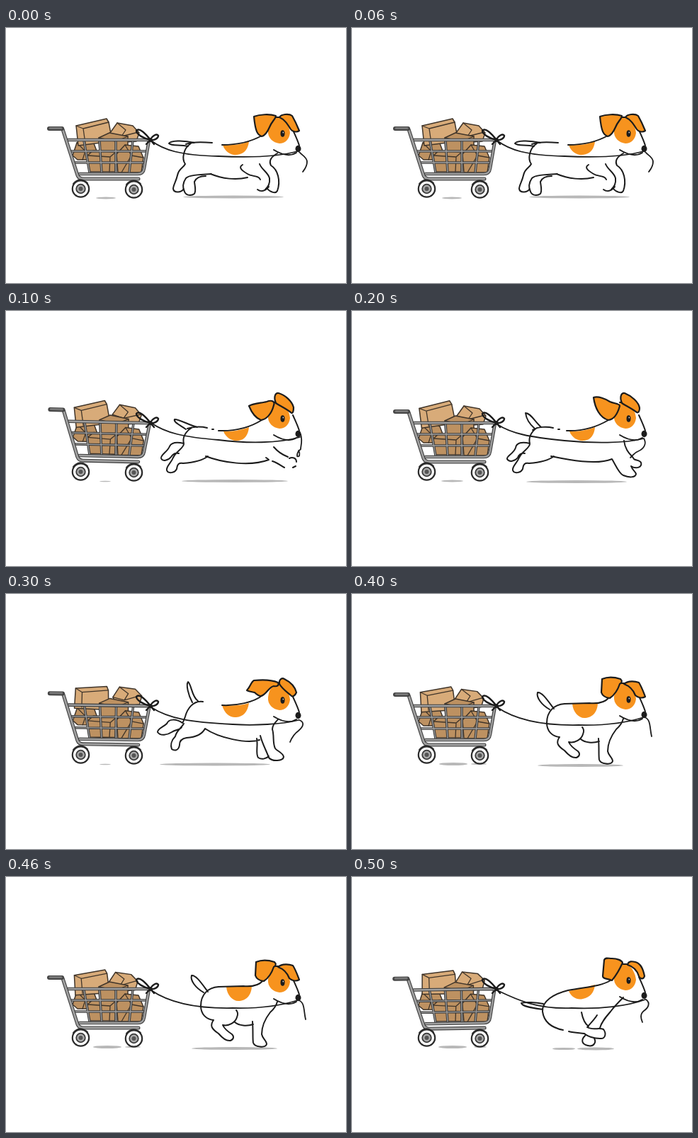
Write an HTML page with a canvas that moves like this. It is 480 by 360 pixels and loops after 0.6 s.

```html
<!DOCTYPE html>
<html lang="en">
<head>
<meta charset="utf-8">
<title>Dog pulling a cart</title>
<style>
html, body { margin: 0; width: 100%; height: 100%; overflow: hidden; background: #fff; }
canvas { display: block; }
</style>
</head>
<body>
<canvas id="stage" width="480" height="360"></canvas>
<script>
const ctx = document.getElementById('stage').getContext('2d');
const INK = '#1c1c1c', ORANGE = '#f7931e', TAN = '#d8ab79', SHADED = '#bd9161', GREY = '#b8b8b8';
const STEP = 100;

// tilt: cart angle in degrees; big, small: [dx, dy, degrees] of the top boxes;
// head: vertical shift; shade: [left, right, y] ground shadows
const poses = [
  {
    tilt: 0, big: [0, 0, 0], small: [0, 0, 0], head: -1,
    shade: [[250, 392, 238.5], [127, 155, 240]],
    ears: ['M350 125C358 122 372 121 381 124C381 128 375 132 372 140C369 147 365 152 361 153C355 151 352 146 350 125Z',
      'M386 126C388 122 399 120 404 124C408 131 412 140 414 145C410 148 404 146 402 143C397 135 393 129 386 126Z'],
    spot: 'M306 165C309 175 318 180 326 179C337 178 342 170 343 160C330 165 318 166 306 165Z',
    body: 'M266 162C249 158 232 159 230 163C234 167 246 164 257 167M254 164C264 160 280 161 291 162M305 165C325 165 345 161 361 152' +
      'M261 163C250 170 248 185 253 192C250 198 244 198 242 208C240 217 236 222 236 227C237 233 247 233 251 227' +
      'M290 206C270 207 258 208 254 212C250 218 249 225 252 231C254 237 262 237 266 234C269 229 266 221 266 217C269 210 276 209 282 209' +
      'M289 206C305 213 325 215 341 211M334 193C327 197 334 202 341 206C347 210 357 208 359 214M371 224C366 230 360 232 355 228' +
      'M358 192C361 200 370 204 372 212C373 220 370 224 366 228M383 177C374 182 371 188 374 194C384 200 388 216 383 230C381 234 373 232 369 227',
    rope: 'M205 159C222 172 246 180 300 181C340 183 380 183 412 174M414 175C418 180 425 182 425 189C425 196 421 200 419 203'
  },
  {
    tilt: 1.3, big: [-4, 0, -1], small: [2, -1, 0], head: 2,
    shade: [[248, 398, 240], [132, 148, 240.5]],
    ears: ['M343 134C350 130 361 130 368 128C376 125 380 128 378 133C375 145 368 153 360 154C352 151 347 144 343 134Z',
      'M381 130C377 120 381 115 385 116C395 119 404 128 406 136C406 143 404 146 402 143C394 137 387 134 381 130Z'],
    spot: 'M307 170C311 180 320 184 328 183C337 182 342 175 343 164C330 169 318 170 307 170Z',
    body: 'M270 164C258 161 243 152 238 153C236 157 246 161 254 167M256 166C264 163 276 163 284 165M291 167L293 167M300 169C325 170 345 164 361 154' +
      'M262 165C252 171 249 180 251 187C242 185 234 185 231 191C228 199 218 203 219 208C221 213 229 211 233 206C236 201 240 200 244 201' +
      'M251 187C252 193 240 198 236 207C233 215 226 219 227 225C229 230 238 229 241 223C242 216 244 214 250 215C264 214 276 212 285 205' +
      'M282 205C305 214 345 220 371 210M367 207L370 209M378 192C384 199 390 203 398 206M376 212C383 214 387 218 393 221' +
      'M400 208C404 206 410 207 410 213M409 219L405 221',
    rope: 'M205 158C225 172 250 178 300 182C340 187 385 187 415 178M416 174C419 184 416 190 416 195C413 198 411 199 411 205C414 207 416 202 413 197'
  },
  {
    tilt: 0, big: [-4, -1, -1], small: [1, 0, 0], head: 2,
    shade: [[246, 388, 241], [126, 157, 240]],
    ears: ['M341 122C348 120 358 124 364 128C370 131 377 130 378 134C375 145 370 153 362 154C350 151 343 137 341 122Z',
      'M381 130C377 120 381 115 385 116C395 120 405 129 406 137C406 142 404 144 402 143C394 137 387 134 381 130Z'],
    spot: 'M307 170C311 180 320 184 328 183C337 182 342 175 343 164C330 169 318 170 307 170Z',
    body: 'M267 164C258 156 252 144 245 144C246 152 251 160 258 166M255 168C262 163 276 163 284 165M291 167L293 167M303 169C325 170 345 164 362 154' +
      'M261 165C252 171 249 180 251 187C240 184 232 186 231 193C228 202 218 204 219 209C222 214 230 212 234 207C236 202 239 200 244 201' +
      'M251 187C252 193 240 198 236 207C233 215 226 219 227 225C229 230 238 229 241 223C242 216 244 214 250 215C264 214 276 212 285 205' +
      'M281 205C305 210 345 218 367 209C372 217 377 230 383 232C390 235 400 236 401 230C400 226 396 225 394 219' +
      'M394 219C402 224 410 220 408 214C406 210 400 211 398 209C396 204 386 200 384 183',
    rope: 'M205 160C225 173 250 178 300 183C340 187 385 187 412 180M412 180C417 188 411 195 404 198C398 200 397 204 393 207'
  },
  {
    tilt: .8, big: [-3, 0, 9], small: [3, -3, -3], head: 0,
    shade: [[217, 373, 240.5], [132, 148, 240.5]],
    ears: ['M340 136C345 131 346 124 350 122C360 121 375 121 384 125C386 129 383 131 378 130C371 131 368 142 360 144C356 144 353 141 351 139C347 138 343 138 340 136Z',
      'M386 127C385 120 390 118 393 120C401 124 408 131 410 139C408 144 404 146 402 143C395 137 390 134 386 127Z'],
    spot: 'M305 157C309 170 317 175 325 174C335 173 341 167 343 154C330 158 318 158 305 157Z',
    body: 'M271 151C262 145 262 128 257 124C254 128 257 142 263 153M278 152C264 150 256 162 253 173C251 179 250 181 249 182' +
      'C240 176 230 176 227 183C222 188 214 190 214 195C218 201 228 199 234 195C240 191 246 192 248 188' +
      'M251 183C248 189 241 192 239 201C233 207 232 214 234 219C238 222 244 221 245 213C245 207 248 204 255 203C270 202 278 196 281 190' +
      'C300 203 340 212 358 206M305 157C325 158 350 153 362 143' +
      'M354 204C356 215 352 225 356 231C361 234 367 233 371 229M359 200C362 212 368 222 371 231C376 237 391 236 392 230' +
      'C391 224 383 222 380 218C376 210 379 200 376 191C376 184 381 181 384 177',
    rope: 'M205 160C230 176 260 181 320 184C350 186 390 184 413 178M414 178C422 181 420 187 413 193C406 198 403 204 401 209'
  },
  {
    tilt: 0, big: [-3, 2, 3], small: [-2, 0, -2], head: -1,
    shade: [[262, 383, 242], [123, 163, 240], [168, 190, 240]],
    ears: ['M353 120C360 117 370 117 379 120C382 123 381 125 378 127C375 136 370 143 364 147C356 146 353 142 352 139Z',
      'M384 127C390 122 400 123 405 125C409 131 412 140 414 145C409 148 403 146 400 143C397 135 392 130 384 127Z'],
    spot: 'M311 155C312 167 320 175 328 175C338 175 347 168 347 153C335 155 322 154 311 155Z',
    body: 'M285 162C276 150 268 138 262 139C260 146 267 156 279 163M362 147C356 154 346 155 335 154L300 155C285 156 275 166 275 182' +
      'C275 194 283 201 293 202C287 210 291 215 300 221C306 228 311 232 317 231C323 228 321 224 319 222C313 218 308 214 306 209' +
      'C315 211 324 205 326 198C328 193 327 190 325 188M323 205C329 210 340 211 349 208' +
      'M348 204C349 218 348 228 349 234C351 240 366 242 368 236C368 231 362 228 361 222C361 210 366 200 373 191C380 185 382 180 383 176',
    rope: 'M205 160C230 177 270 186 320 185C360 186 390 181 412 174M413 174C422 177 420 188 423 201'
  },
  {
    tilt: -.8, big: [0, 1, 7], small: [0, -1, -3], head: -4,
    shade: [[283, 315, 242.5], [318, 370, 242.5], [122, 162, 240], [172, 190, 240]],
    ears: ['M356 117C358 113 362 115 367 115C375 115 381 118 382 121C378 130 372 140 367 146C360 143 354 144 354 140Z',
      'M389 124C390 118 396 119 400 120C408 122 411 130 413 140C411 146 406 143 405 140C402 130 396 126 389 124Z'],
    spot: 'M306 161C310 170 318 174 326 172C336 170 342 163 343 152C330 156 318 158 306 161Z',
    body: 'M270 179C260 177 245 176 239 178C240 183 255 185 269 187M365 146C350 155 330 155 305 160C285 165 268 175 269 190' +
      'C271 205 283 213 298 216M306 218C314 220 320 220 328 221M324 191C326 202 330 208 334 211M346 195C341 203 335 208 332 212' +
      'C340 217 349 212 355 215C360 222 357 229 350 228C342 228 332 225 328 221M329 224C323 230 324 236 333 238C342 240 345 233 342 228' +
      'M383 170C375 178 370 183 365 190C358 198 352 205 350 213',
    rope: 'M205 160C230 172 260 187 310 185C350 187 390 182 414 173M415 173C422 178 418 185 412 189C406 194 408 200 410 205'
  }
];

function draw(path, line, width = 2, fill) {
  const p = new Path2D(path);
  if (fill) { ctx.fillStyle = fill; ctx.fill(p); }
  if (line) { ctx.strokeStyle = line; ctx.lineWidth = width; ctx.stroke(p); }
}

function disc(x, y, rx, ry, fill, line, width = 1) {
  ctx.beginPath();
  ctx.ellipse(x, y, rx, ry, 0, 0, 7);
  ctx.fillStyle = fill;
  ctx.fill();
  if (line) { ctx.strokeStyle = line; ctx.lineWidth = width; ctx.stroke(); }
}

function turned(x, y, [dx, dy, deg], paint) {
  ctx.save();
  ctx.translate(x + dx, y + dy);
  ctx.rotate(deg * Math.PI / 180);
  ctx.translate(-x, -y);
  paint();
  ctx.restore();
}

function tube(path, width) {
  draw(path, '#3c3c3c', width);
  draw(path, '#a0a0a0', width - 2.2);
}

function box(outline, edges, fill = SHADED) {
  draw(outline, '#40352a', 1.5, fill);
  draw(edges, '#40352a', 1.3);
}

function wheel(x, y) {
  disc(x, y, 11.7, 11.7, '#fff', '#2b2b2b', 2.2);
  disc(x, y, 6.3, 6.3, '#aaa', '#3a3a3a', 1.8);
  disc(x, y, 3, 3, '#555');
}

function cart({ tilt, big, small }) {
  turned(190, 200, [0, 0, tilt], () => {
    box('M94 180L100 162L112 157L124 163L129 176L123 186L101 186Z', 'M100 162L112 174L129 176M112 174L108 186');
    turned(123, 145, big, () =>
      box('M99 138L142 128L145 133L150 160L102 166Z', 'M99 138L109 142L145 133M109 142L112 163', TAN));
    turned(168, 147, small, () =>
      box('M147 148L157 134L179 138L188 148L184 160L154 162Z', 'M147 148L163 153L187 147M157 134L169 144L163 153', TAN));
    box('M131 155L146 148L172 153L172 176L132 176Z', 'M131 155L155 160L172 153M155 160L155 175');
    box('M156 178L168 165L187 167L194 183L191 204L158 204Z', 'M168 165L177 180L194 183M177 180L163 204');
    box('M115 180L123 173L155 175L154 203L117 203Z', 'M115 180L147 182L155 175M147 182L146 203');
    tube('M92 174L198 174M97 190L195 190M110 159L118 204M132 159L135 204M155 159L155 204M179 159L174 204', 3.5);
    tube('M88 158L202 158L195 198Q194 206 186 206L104 206', 4.6);
    tube('M80 143L101 208Q103 213 109 213L187 213', 5);
    draw('M61 142L79 142', '#444', 6);
    draw('M62 141.5L78 141.5', '#777', 3);
  });
  draw('M95 220Q104 209 115 219M170 221Q179 210 190 220', '#333');
  wheel(105.5, 227);
  wheel(180.5, 228);
}

function head({ head: dy, ears }) {
  ctx.save();
  ctx.translate(0, dy);
  draw('M370 146C371 137 374 131 380 127L389 127C395 131 400 140 401 149C400 158 394 164 386 164C377 163 369 156 370 146Z', null, 0, ORANGE);
  draw('M378 127L388 127M405 145C408 152 412 160 414 167M410 177C402 182 391 181 378 173', INK);
  disc(390.5, 150, 3, 4.8, INK);
  disc(391.3, 148.5, .7, 1, '#fff');
  disc(412.5, 171.5, 4, 4.7, INK);
  ctx.restore();
  ears.forEach(ear => draw(ear, INK, 2.2, ORANGE));
}

function render(pose) {
  ctx.fillStyle = '#fff';
  ctx.fillRect(0, 0, 480, 360);
  pose.shade.forEach(([a, b, y]) => disc((a + b) / 2, y, (b - a) / 2, Math.min(2, (b - a) / 20), GREY));
  cart(pose);
  draw(pose.spot, null, 0, ORANGE);
  draw(pose.body, INK);
  head(pose);
  draw(pose.rope, INK, 1.8);
  draw('M204 158C194 156 184 150 184 145C188 140 197 149 204 158C207 151 213 149 215 152C215 156 209 159 204 158L198 164M204 158L209 164', INK, 2.4);
  disc(204, 158, 2.5, 3, INK);
}

ctx.lineCap = ctx.lineJoin = 'round';
const start = performance.now();
function tick() {
  const t = performance.now() - start;
  render(poses[Math.floor(t / STEP) % poses.length]);
  requestAnimationFrame(tick);
}
tick();
</script>
</body>
</html>
```
